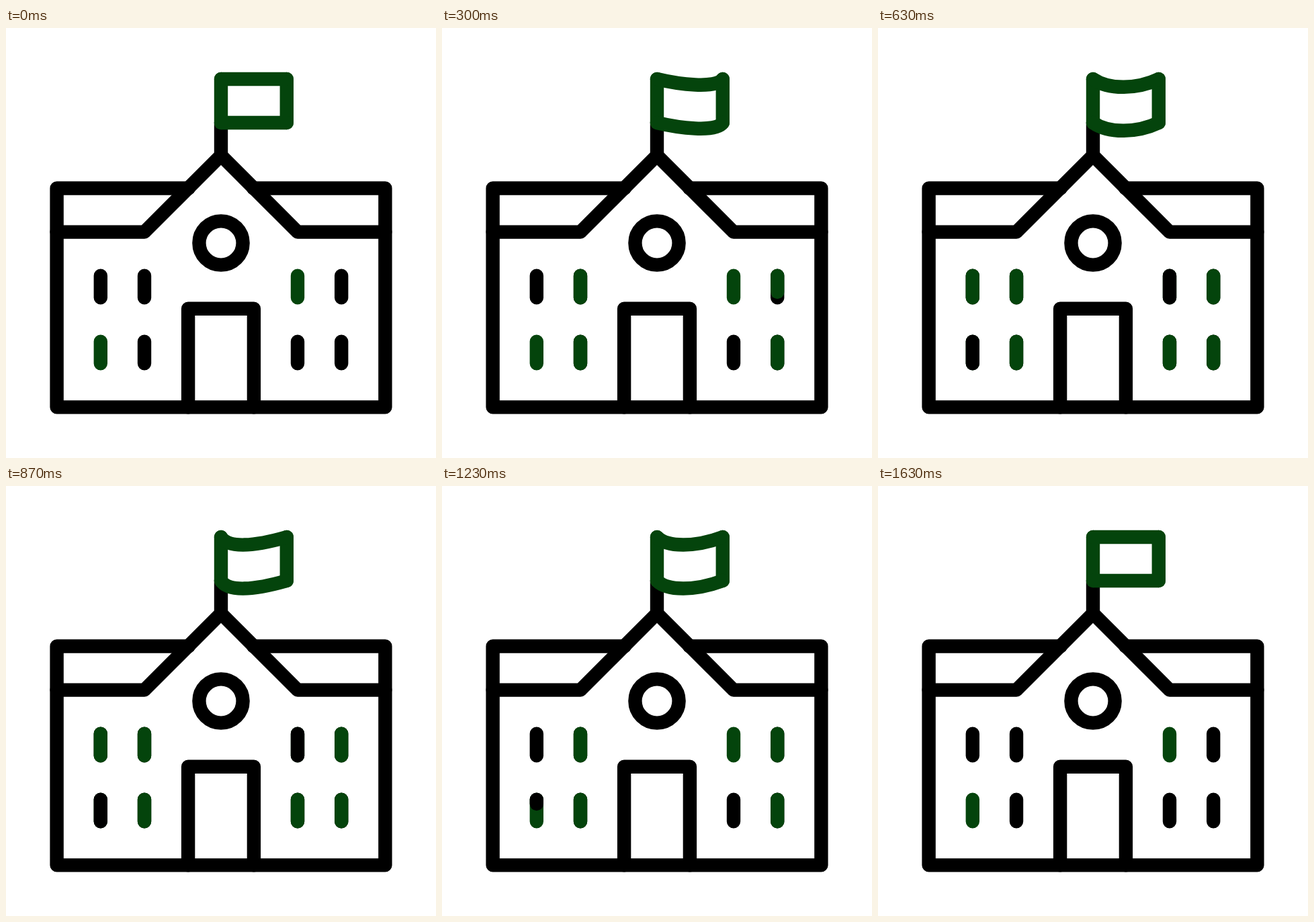
Write an HTML page without scripts that moves like this. It is 640 px wide and 640 px high and loops after 1.67 s.

```html
<!DOCTYPE html>
<html lang="en">
<head>
<meta charset="utf-8">
<title>School</title>
<style>
@property --p { syntax: "<number>"; inherits: true; initial-value: 0; }

html, body { margin: 0; width: 100%; height: 100%; overflow: hidden; background: #fff; }

svg {
  --green: #04440c;
  display: block; width: 100%; height: 100%;
  fill: none; stroke: #000; stroke-width: 20.4;
  stroke-linecap: round; stroke-linejoin: round;
  animation: progress 1670ms linear infinite;
}
.green { stroke: var(--green); }

/* --p counts the windows switched so far; window --k fills from k to k + 1 */
@keyframes progress {
  0%, 5.8% { --p: 0; }
  31.9%, 61.9% { --p: 8; }
  86.8%, 100% { --p: 0; }
}
.fill path {
  stroke-dasharray: 32.6 100;
  stroke-dashoffset: clamp(0px, (1 + var(--k) - var(--p)) * 33px, 33px);
}

.wave { animation: wave 1670ms infinite; }
@keyframes wave {
  0% { d: path("M320 76c30 0 70 0 97.8 0"); animation-timing-function: cubic-bezier(.5, 0, .8, .5); }
  10.1% { d: path("M320 76c32 2 78 2 97.8 0"); animation-timing-function: cubic-bezier(.3, .2, .6, 1); }
  24% { d: path("M320 76c32 10 91 20 97.8 0"); animation-timing-function: cubic-bezier(.4, 0, .7, .7); }
  37.8% { d: path("M320 76c24 16.5 66 15 97.8 0"); animation-timing-function: cubic-bezier(.3, .3, .6, 1); }
  48% { d: path("M320 76c7 18 42 13 97.8 0"); animation-timing-function: ease-in-out; }
  64% { d: path("M320 76c35 10 93 20 97.8 0"); animation-timing-function: ease-in-out; }
  79.6% { d: path("M320 76c7 18 42 13 97.8 0"); animation-timing-function: cubic-bezier(.4, 0, .8, .7); }
  85.7% { d: path("M320 76c10 14 44 12 97.8 0"); animation-timing-function: cubic-bezier(.3, .3, .6, 1); }
  96%, 100% { d: path("M320 76c30 0 70 0 97.8 0"); }
}
</style>
</head>
<body>
<svg viewBox="0 0 640 640">
  <!-- building -->
  <path d="M320 141V189.6"/>
  <path d="M272 238.5H75.6V564.4H564.4V238.5H368"/>
  <path d="M75.6 303.6H206L320 189.6L434 303.6H564.4"/>
  <path d="M271.1 564.4V417.7H368.9V564.4"/>
  <circle cx="320" cy="320" r="32.6"/>

  <!-- windows at rest -->
  <path d="M140.8 368.8v32.6M206 368.8v32.6M499.2 368.8v32.6M206 466.6v32.6M434 466.6v32.6M499.2 466.6v32.6"/>
  <path class="green" d="M434 368.8v32.6M140.8 466.6v32.6"/>

  <!-- windows switching one after another -->
  <g class="fill green">
    <path style="--k:0" d="M206 466.6v32.6"/>
    <path style="--k:1" d="M499.2 466.6v32.6"/>
    <path style="--k:2" d="M206 368.8v32.6"/>
    <path style="--k:3" d="M499.2 368.8v32.6"/>
    <path style="--k:5" d="M434 466.6v32.6"/>
    <path style="--k:6" d="M140.8 368.8v32.6"/>
  </g>
  <g class="fill">
    <path style="--k:4" d="M140.8 466.6v32.6"/>
    <path style="--k:7" d="M434 368.8v32.6"/>
  </g>

  <!-- flag -->
  <g class="green">
    <path d="M320 76v65M417.8 76v65"/>
    <path class="wave" d="M320 76c30 0 70 0 97.8 0"/>
    <path class="wave" d="M320 76c30 0 70 0 97.8 0" transform="translate(0 65)"/>
  </g>
</svg>
</body>
</html>
```
